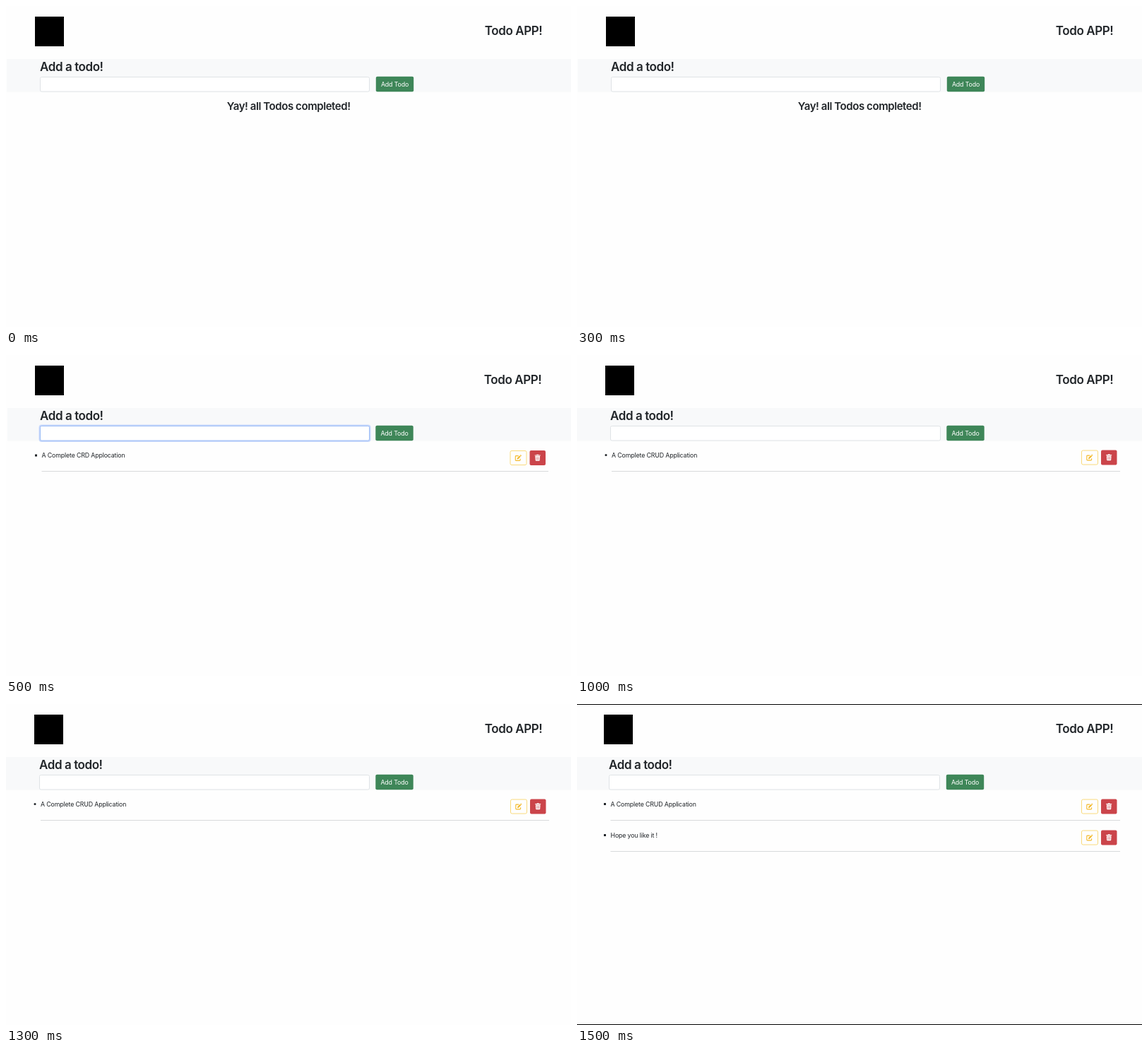
An HTML page that plays this animation: 800 by 454 pixels, repeating every 2 s.

```html
<!DOCTYPE html>
<html lang="en">
<head>
<meta charset="utf-8">
<title>Todo list</title>
<style>
  html, body { margin: 0; width: 100%; height: 100%; overflow: hidden; background: #fefefe; }
  svg { display: block; font-family: Inter, sans-serif; fill: #212529; }
  .title { font-size: 17px; font-weight: 560; letter-spacing: -.42px; }
  .notice { font-size: 15px; font-weight: 560; letter-spacing: -.43px; }
  .body { font-size: 8.8px; letter-spacing: -.14px; }
</style>
</head>
<body>
<svg id="stage" width="800" height="454" viewBox="0 0 800 454"></svg>
<script>
const STEP = 500;
const stage = document.getElementById('stage');

// Horizontal positions shift slightly between screens.
const screens = [
  { band: 1, logo: 41, left: 48, right: 515, add: 524, title: 759.3, items: [] },
  { band: 2, logo: 41, left: 48, right: 515, add: 523.5, title: 758.3, focus: true,
    text: 50.5, edit: 713.5, trash: 741.5, end: 768, top: 135, items: ['A Complete CRD Applocation'] },
  { band: 0, logo: 40, left: 47, right: 515, add: 523.5, title: 759.3, round: true,
    text: 49, edit: 714, trash: 742, end: 769, top: 134.5, items: ['A Complete CRUD Application'] },
  { band: 0, logo: 38, left: 45, right: 514, add: 523, title: 759.3, framed: true,
    text: 47.5, edit: 714, trash: 742, end: 769, top: 134.5,
    items: ['A Complete CRUD Application', 'Hope you like it !'] }
];

const rect = (x, y, w, h, fill, more = '') =>
  `<rect x="${x}" y="${y}" width="${w}" height="${h}" fill="${fill}" ${more}/>`;
const label = (x, y, text, style, more = '') =>
  `<text x="${x}" y="${y}" class="${style}" ${more}>${text}</text>`;

const editIcon = (x, y) => `<g transform="translate(${x} ${y})" fill="#f3b92b">
  <path d="M5 1.6H1.5Q.6 1.6 .6 2.5V7.5Q.6 8.4 1.5 8.4H6.5Q7.4 8.4 7.4 7.5V5.8" fill="none" stroke="#f3b92b" stroke-width="1.1"/>
  <path d="M2.8 6.5L3.1 4.7L6.6 1.2L8.1 2.7L4.6 6.2ZM7 .8L7.5 .3Q7.9 0 8.3 .3L9 1Q9.3 1.4 9 1.8L8.5 2.3Z"/></g>`;

const trashIcon = (x, y) => `<g transform="translate(${x} ${y})" fill="#fff">
  <path d="M0 .7H2.3L2.8 0H5.2L5.7 .7H8V1.8H0ZM.6 2.4H7.4L7 8.2Q6.9 9 6.2 9H1.8Q1.1 9 1 8.2Z"/>
  <path d="M2.4 3.6V7.8M4 3.6V7.8M5.6 3.6V7.8" stroke="#cb444a" stroke-width=".55"/></g>`;

function row(s, text, index) {
  const shift = index * 44, y = s.top + shift;
  return rect(s.text - 9.5, y + 5.5, 3, 3, '#212529', s.round ? 'rx="1.5"' : '') +
    label(s.text, 144.9 + shift, text, 'body') +
    rect(s.edit + .5, y + .5, 23, 20, '#fefefe', 'rx="2" stroke="#f9da7c"') +
    editIcon(s.edit + 7.2, y + 6) +
    rect(s.trash, y, 22.5, 21, '#cb444a', 'rx="2"') +
    trashIcon(s.trash + 7.2, y + 5.7) +
    rect(s.text, 164 + shift, s.end - s.text, 1, '#d8dadc');
}

function draw(s) {
  const field = [s.left + .5, 100.5, s.right - s.left - 1, 20.5];
  stage.innerHTML =
    rect(s.band, 75, 800 - s.band, 46.5, '#f8f9fa') +
    rect(s.logo, 15, 41, 42, '#000') +
    label(s.title, 41.2, 'Todo APP!', 'title', 'text-anchor="end"') +
    label(s.left, 92, 'Add a todo!', 'title') +
    (s.focus ? rect(...field, 'none', 'rx="2" stroke="#c7d8fb" stroke-width="4"') : '') +
    rect(...field, '#fff', `rx="2" stroke="${s.focus ? '#9dbdf6' : '#dfe3e6'}"`) +
    rect(s.add - .2, 99.7, 53.4, 21.5, '#3e8658', 'rx="2"') +
    label(s.add + 26.5, 114, 'Add Todo', 'body', 'text-anchor="middle" fill="#fff"') +
    (s.items.length
      ? s.items.map((text, i) => row(s, text, i)).join('')
      : label(400.2, 147.2, 'Yay! all Todos completed!', 'notice', 'text-anchor="middle"')) +
    (s.framed ? rect(0, 0, 800, 1, '#000') + rect(0, 453, 800, 1, '#000') : '');
}

let shown = -1;
function tick() {
  const current = Math.floor(performance.now() / STEP) % screens.length;
  if (current !== shown) draw(screens[shown = current]);
  requestAnimationFrame(tick);
}
tick();
</script>
</body>
</html>
```
